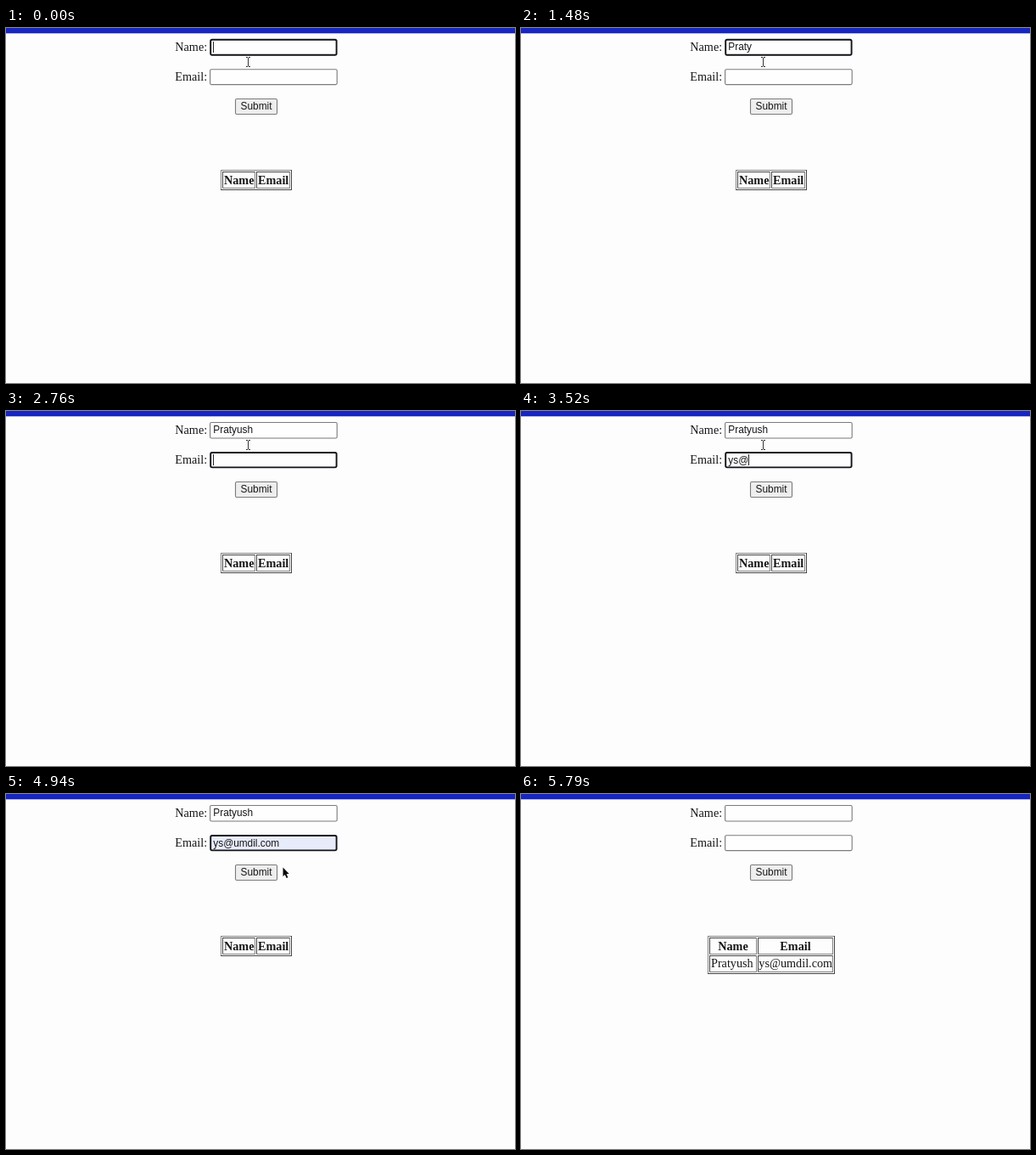
Animation, 600 px wide and 418 px high, one loop 6300 ms. Source, as an HTML page with a canvas:

```html
<!DOCTYPE html>
<html lang="en">
<head>
<meta charset="utf-8">
<title>Form to table</title>
<style>
  html, body { margin: 0; width: 600px; height: 418px; overflow: hidden; background: #fefdfe; }
  canvas { display: block; }
</style>
</head>
<body>
<canvas id="stage" width="600" height="418"></canvas>
<script>
const ctx = document.getElementById('stage').getContext('2d');
const LOOP = 6300;
const SERIF = '14.2px "Liberation Serif", serif';
const BOLD = 'bold ' + SERIF;
const SANS = '11.85px "Liberation Sans", sans-serif';
const INK = '#161616', LIGHT = '#828282', DARK = '#454545';

const NAME = 'Pratyush', EMAIL = 'ys@umdil.com';
const nameKeys = [330, 450, 570, 690, 850, 2150, 2240, 2330];
const emailKeys = [3260, 3360, 3520, 3855, 3880];
const FOCUS_EMAIL = 2600, AUTOFILL = 4680, SUBMIT = 5360, CURSOR_GONE = 5450;
const BLINK = 500;

function text(str, x, y, font, align = 'left', color = INK) {
  ctx.font = font;
  ctx.textAlign = align;
  ctx.fillStyle = color;
  ctx.fillText(str, x, y);
}

function box(x, y, w, h, r, fill, stroke, width) {
  ctx.beginPath();
  ctx.roundRect(x, y, w, h, r);
  ctx.fillStyle = fill;
  ctx.fill();
  ctx.strokeStyle = stroke;
  ctx.lineWidth = width;
  ctx.stroke();
}

// One-pixel frame with separate top-left and bottom-right colours.
function bevel(x, y, right, bottom, topLeft, bottomRight) {
  const w = right - x, h = bottom - y;
  ctx.fillStyle = topLeft;
  ctx.fillRect(x, y, w, 1);
  ctx.fillRect(x, y, 1, h);
  ctx.fillStyle = bottomRight;
  ctx.fillRect(x, bottom - 1, w, 1);
  ctx.fillRect(right - 1, y, 1, h);
}

const cell = (x, y, right, bottom) => bevel(x, y, right, bottom, DARK, LIGHT);

function field(y, h, value, focused, caret, filled) {
  const fill = filled ? '#e8ecfa' : '#fffeff';
  if (focused) box(241.2, y + 0.7, 148.4, h - 1.4, 1.8, fill, '#111118', 1.9);
  else box(240.6, y + 0.5, 149.6, h - 1, 1.5, fill, '#7b7b7b', 1.1);
  text(value, 244.3, y + 13.4, SANS);
  if (caret) {
    ctx.fillStyle = '#222';
    ctx.fillRect(244 + Math.round(ctx.measureText(value).width), Math.round(y) + 3, 1, 13);
  }
}

function table(filled) {
  if (!filled) {
    bevel(253, 167, 337, 191, LIGHT, DARK);
    cell(255, 169, 294, 189);
    cell(295, 169, 335, 189);
    text('Name', 257, 184, BOLD);
    text('Email', 297, 184, BOLD);
    return;
  }
  bevel(220, 167, 370, 212, LIGHT, DARK);
  for (const [top, bottom] of [[169, 189], [190, 210]]) {
    cell(222, top, 278, bottom);
    cell(279, top, 368, bottom);
  }
  text('Name', 250, 184, BOLD, 'center');
  text('Email', 323.5, 184, BOLD, 'center');
  text(NAME, 224, 204, SERIF);
  text(EMAIL, 280.3, 204, SERIF);
}

function ibeam(x, y) {
  ctx.fillStyle = '#333';
  ctx.fillRect(x, y - 5, 1, 10);
  for (const dy of [-6, 5]) {
    ctx.fillRect(x - 2, y + dy, 2, 1);
    ctx.fillRect(x + 1, y + dy, 2, 1);
  }
}

function arrow(x, y) {
  ctx.beginPath();
  ctx.moveTo(x, y);
  for (const [dx, dy] of [[0, 10.5], [2.3, 8.4], [4.2, 12.6], [5.9, 11.8], [4.1, 7.7], [7.2, 7.5]])
    ctx.lineTo(x + dx, y + dy);
  ctx.closePath();
  ctx.fillStyle = '#080808';
  ctx.fill();
}

function glide(t, start, end) {
  const p = Math.min(1, Math.max(0, (t - start) / (end - start)));
  return p * p * (3 - 2 * p);
}

function pointer(t) {
  if (t >= CURSOR_GONE) return;
  if (t < AUTOFILL) return ibeam(285, 40);
  const a = glide(t, AUTOFILL, 4900), b = glide(t, 4970, 5240);
  arrow(285 + 41.5 * a - 22 * b, 40 + 46.5 * a + 5 * b);
}

const count = (keys, t) => keys.filter(k => k <= t).length;

function caretOn(t) {
  const last = [0, ...nameKeys, FOCUS_EMAIL, ...emailKeys].filter(k => k <= t).pop();
  return t < AUTOFILL && Math.floor((t - last) / BLINK) % 2 === 0;
}

function draw(t) {
  const sent = t >= SUBMIT, onEmail = t >= FOCUS_EMAIL;
  const filled = t >= AUTOFILL && !sent;
  const caret = caretOn(t);
  const name = sent ? '' : NAME.slice(0, count(nameKeys, t));
  const email = sent ? '' : filled ? EMAIL : EMAIL.slice(0, count(emailKeys, t));

  ctx.fillStyle = '#fefdfe';
  ctx.fillRect(0, 0, 600, 418);
  ctx.fillStyle = '#1725c1';
  ctx.fillRect(0, 0, 600, 6.3);

  text('Name:', 199.3, 27, SERIF);
  text('Email:', 199.3, 62, SERIF);
  field(13, 19.5, name, !onEmail, caret && !onEmail, false);
  field(48.3, 18.8, email, onEmail && !sent, caret && onEmail, filled);

  box(270.5, 83.5, 49, 18, 1.5, '#efeeef', '#7b7b7b', 1.1);
  text('Submit', 295, 96.3, SANS, 'center');
  table(sent);
  pointer(t);
}

const begin = performance.now();
function tick() {
  draw((performance.now() - begin) % LOOP);
  requestAnimationFrame(tick);
}
tick();
</script>
</body>
</html>
```
